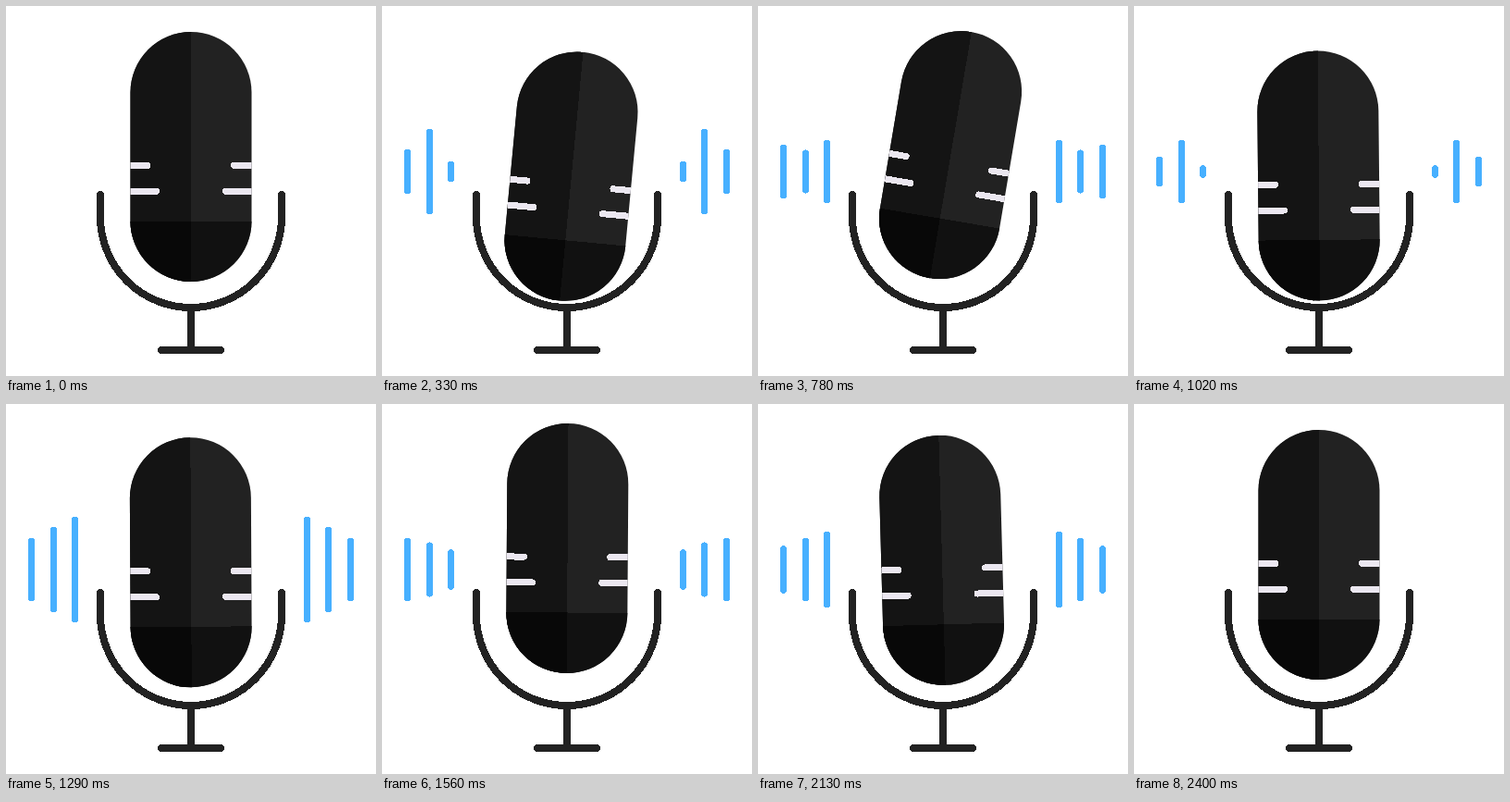
An HTML page for the animation above (2430 ms loop, 400x400 px).

```html
<!DOCTYPE html>
<html lang="en">
<head>
<meta charset="utf-8">
<title>Microphone</title>
<style>
  html, body { margin: 0; width: 100%; height: 100%; overflow: hidden; background: #fff; }
  svg { display: block; width: 100%; height: 100%; shape-rendering: crispEdges; }
  path { fill: none; stroke-width: 7; stroke-linecap: round; }
  .stand { stroke: #222; stroke-width: 8; }
</style>
</head>
<body>
<svg viewBox="0 0 400 400">
  <clipPath id="capsule"><rect x="134.5" y="28" width="131" height="270" rx="65.5"/></clipPath>
  <path id="waves" stroke="#47b0ff"/>
  <path class="stand" d="M102 204V228A98 98 0 0 0 298 228V204M200 326V372M168 372H232"/>
  <g id="mic" clip-path="url(#capsule)">
    <rect x="134" y="28" width="132" height="270" fill="#222"/>
    <rect x="134" y="28" width="66.3" height="270" fill="#141414"/>
    <rect x="134" y="232.5" width="132" height="66" fill="#111"/>
    <rect x="134" y="232.5" width="66.3" height="66" fill="#080808"/>
    <path d="M130 172.400H153M130 200.200H162.500M270 172.400H246.500M270 200.200H237.500" stroke="#ebe7f0"/>
  </g>
</svg>
<script>
const STEP = 30, STEPS = 81;

// [step, value] pairs, eased in and out between neighbours.
const lift = [[0, 0], [11.5, 21], [23, -7], [35, 21], [52, -7], [65, 9], [80, 0]];
const tilt = [[0, 0], [23, 11.5], [35, -0.8], [53, 0.4], [65, -2.4], [80, 0]];

// Each bar swings around its mean height and is mirrored on the right.
const bars = [
  { x: 27.5, mean: 56, swing: 24, peak: 19.5, period: 28 },
  { x: 51.5, mean: 70, swing: 23, peak: 11.5, period: 30.5 },
  { x: 74.5, mean: 64, swing: 55, peak: 20.3, period: 24.2 }
];

function valueAt(keys, t) {
  const next = keys.findIndex(key => key[0] > t);
  if (next < 0) return keys[keys.length - 1][1];
  const [t0, v0] = keys[next - 1], [t1, v1] = keys[next];
  const u = (t - t0) / (t1 - t0);
  return v0 + (v1 - v0) * u * u * (3 - 2 * u);
}

function barPath({ x, mean, swing, peak, period }, t) {
  const fade = Math.min(1, t / 9, (STEPS - 1 - t) / 12);
  const height = fade * (mean + swing * Math.cos(2 * Math.PI * (t - peak) / period));
  if (height < 1) return "";
  const half = Math.max(0.01, (height - 7) / 2);
  return [x, 400 - x].map(px => `M${px} ${179 - half}v${2 * half}`).join("");
}

const mic = document.getElementById("mic");
const waves = document.getElementById("waves");

function draw() {
  const t = Math.floor(performance.now() / STEP) % STEPS;
  mic.setAttribute("transform",
    `translate(0 ${valueAt(lift, t)}) rotate(${valueAt(tilt, t)} 200 211.5)`);
  waves.setAttribute("d", bars.map(bar => barPath(bar, t)).join(""));
  requestAnimationFrame(draw);
}
draw();
</script>
</body>
</html>
```
